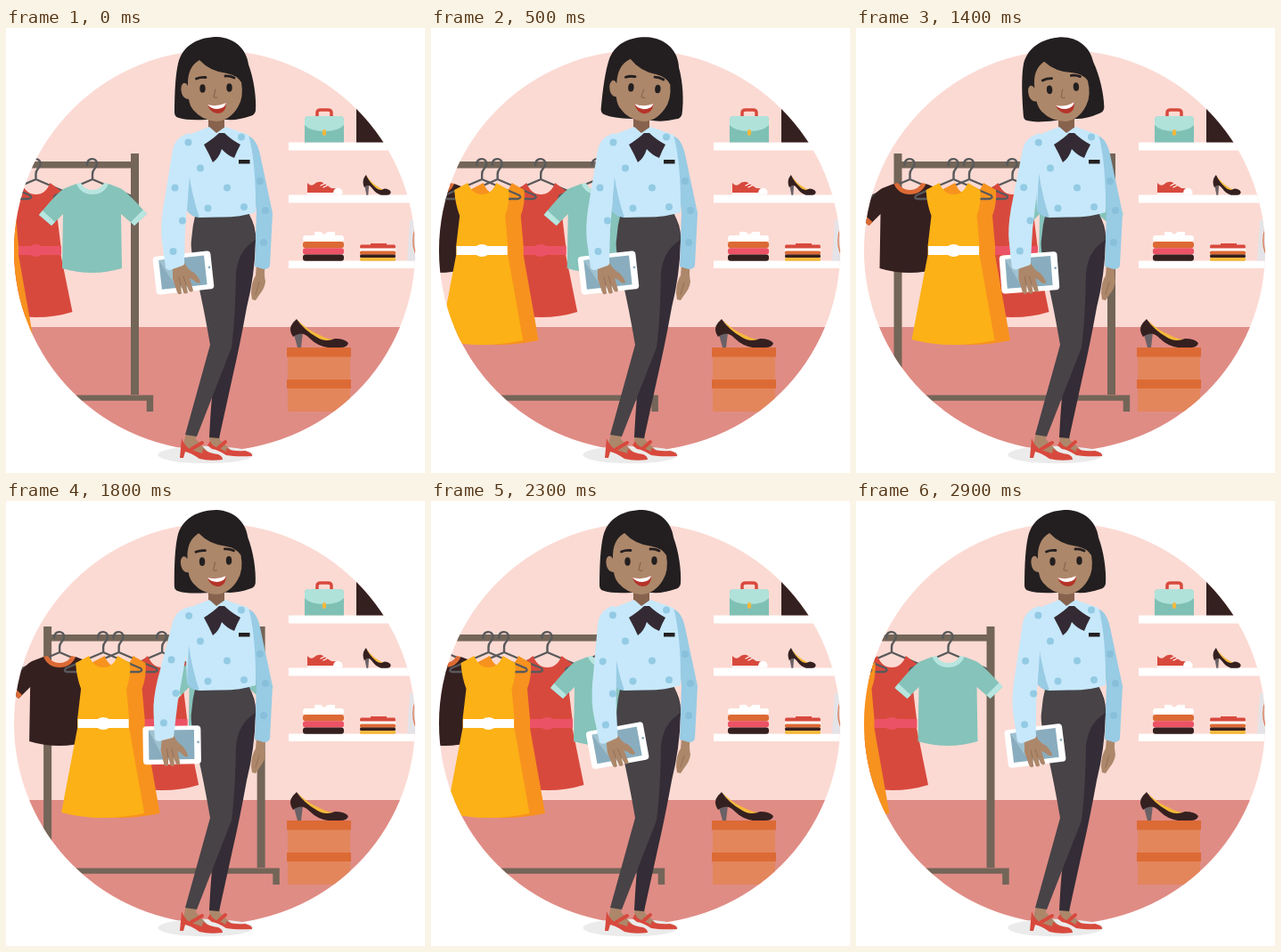
An HTML page for the animation above (3000 ms loop, 470x500 px).

```html
<!DOCTYPE html>
<html lang="en">
<head>
<meta charset="utf-8">
<title>Boutique</title>
<style>
html, body { margin: 0; width: 100%; height: 100%; overflow: hidden; background: #fff; }
svg { display: block; width: 470px; height: 500px; }
.hanger { fill: none; stroke: #58595b; stroke-width: 2.4; stroke-linecap: round; stroke-linejoin: round; }
.skin { fill: #ad876a; }
.hair { fill: #231f20; }
.dot { fill: #93cae4; }
.red { fill: #d8493d; }
.line { fill: none; stroke-linecap: round; stroke-linejoin: round; }
</style>
</head>
<body>
<svg viewBox="0 0 470 500">
<defs>
  <clipPath id="disc"><circle cx="234" cy="250" r="225"/></clipPath>
  <g id="hanger" class="hanger">
    <path d="M-6 154C-7 145 6 145 5 153C4 159 0 158 0 164V170L-42 188Q-45 192 -40 192H40Q45 191 42 188L0 170"/>
  </g>
  <path id="dress" d="M-16 174Q-11 187 0 187Q11 187 16 174L30 182Q31 198 26 211L29 245V255L46 351Q22 356 0 356Q-24 356 -47 350L-29 255V245L-25 211Q-30 198 -31 182Z"/>
  <g id="belt"><rect x="-28.500" y="245" width="57" height="10"/><ellipse cy="250" rx="9" ry="7"/></g>
  <path id="tee" d="M-18 175Q0 192 18 175L31 180Q39 184 61 209L47 222L32 209L33 270Q16 275 0 275Q-18 275 -34 270L-33 209L-46 222L-60 210Q-39 184 -31 180Z"/>
  <path id="cuffs" d="M-60 210L-46 222L-42 218L-56 205ZM61 209L47 222L43 218L57 204Z"/>
  <path id="collar" d="M-18 175Q-13 187 0 187Q13 187 18 175L13 174Q9 182 0 182Q-9 182 -13 174Z"/>
</defs>

<g clip-path="url(#disc)">
  <rect width="470" height="500" fill="#fbdad3"/>
  <rect y="336" width="470" height="164" fill="#df8c85"/>

  <g fill="#fff">
    <rect x="317" y="128.500" width="150" height="9"/>
    <rect x="317" y="187.500" width="150" height="9"/>
    <rect x="317" y="261.500" width="150" height="8.500"/>
  </g>
  <!-- bag and dark bag -->
  <path class="line" d="M349 99V95Q349 92 353 92H361Q365 92 365 95V99" stroke="#d8493d" stroke-width="3.500"/>
  <path d="M339 99H375Q379 99 379 104V128.500H335V104Q335 99 339 99Z" fill="#7fc0b5"/>
  <path d="M339 99H375Q379 99 379 104V109Q373 116 357 116Q341 116 335 109V104Q335 99 339 99Z" fill="#b0e2da"/>
  <rect x="355" y="114" width="4" height="7" rx="2" fill="#f5b83a"/>
  <path d="M393 84H450V128.500H393Z" fill="#352020"/>
  <!-- sneaker and heel -->
  <path class="red" d="M338 174Q341 178 345 176Q349 172 354 173L365 180Q376 180 377 184V186H338Z"/>
  <path d="M338 185H367Q368 179 374 180Q379 182 377 187.500H338Z" fill="#fff"/>
  <path d="M353 177L357 175M356 179L360 177" class="line" stroke="#fff" stroke-width="1.200"/>
  <use href="#pump" transform="translate(400.500 165) scale(.48 .71)"/>
  <!-- folded clothes -->
  <path d="M346 229H353L357 232L361 229H369V233H376Q379 233 379 236.500Q379 240 376 240H336Q333 240 333 236.500Q333 233 336 233H346Z" fill="#fff"/>
  <rect x="333" y="240" width="46" height="7.300" rx="3" fill="#dc6a35"/>
  <rect x="333" y="247.300" width="46" height="7.300" rx="3" fill="#ec5265"/>
  <rect x="333" y="254.500" width="46" height="7.200" rx="3" fill="#352020"/>
  <path class="red" d="M409 242H427V243.500H436Q438 246 436 248H398Q396 246 398 243.500H409Z"/>
  <rect x="397" y="247.500" width="40" height="3.500" rx="1" fill="#fff"/>
  <rect x="397" y="250.500" width="40" height="4.200" rx="1.500" fill="#dc6a35"/>
  <rect x="397" y="254.500" width="40" height="3.500" rx="1.500" fill="#352020"/>
  <rect x="397" y="258" width="40" height="3.700" rx="1.500" fill="#f5b83a"/>
  <path d="M453 216H470V261.500H450Z" fill="#e4e3e7"/>
  <path class="line" d="M460 223Q454 238 459 252" stroke="#dc8460" stroke-width="1.500"/>
  <!-- boxes -->
  <path d="M316 369H386V395H316ZM316 405H386V431H316Z" fill="#e3865c"/>
  <path d="M315 359H387V369.500H315ZM315 395H387V405H315Z" fill="#dc6a35"/>
  <g transform="translate(319 327)">
    <g id="pump">
      <path d="M3 14L14 15L12 32H8Z" fill="#6a6166"/>
      <path d="M8 1Q20 13 33 18Q42 23 50 23L42 28Q24 24 8 1Z" fill="#f5b83a"/>
      <path d="M7 0Q15 12 29 20Q39 27 50 22Q61 22 65 27Q64 32 56 32H42Q30 30 22 22Q15 15 9 17Q5 18 3 20Q-3 11 3 4Z" fill="#352020"/>
    </g>
  </g>

  <g id="rack">
    <path d="M-99 150H141V157.500H-99ZM-99.500 141H-90.500V412H-99.500ZM140 141H149V412H140ZM-115 412.500H165.200V431H157.700V418.800H-115Z" fill="#736558"/>
    <g transform="translate(33.500)">
      <use href="#hanger"/>
      <path class="red" d="M-16 174Q-11 187 0 187Q11 187 16 174L28 183Q28 198 24 212L28 245V255L41 319Q22 325 0 325Q-22 325 -42 319L-28 255V245L-24 212Q-28 198 -28 183Z"/>
      <use href="#belt" fill="#ec5265"/>
    </g>
    <g transform="translate(97)">
      <use href="#hanger"/>
      <use href="#tee" fill="#86c3ba"/>
      <g fill="#b7e5df"><use href="#cuffs"/><use href="#collar"/></g>
    </g>
    <g transform="translate(-81.500)">
      <use href="#hanger"/>
      <use href="#tee" fill="#352020"/>
      <g fill="#dc6a35"><use href="#cuffs"/><use href="#collar"/></g>
    </g>
    <g transform="translate(-15)">
      <use href="#hanger"/>
      <use href="#dress" fill="#f7921e"/>
    </g>
    <g transform="translate(-32.500)">
      <use href="#hanger"/>
      <use href="#dress" fill="#fcb116"/>
      <use href="#belt" fill="#fff"/>
    </g>
  </g>
</g>

<ellipse cx="224" cy="479.500" rx="53.500" ry="9.800" fill="#ebebeb"/>

<!-- feet -->
<path class="skin" d="M202 455H214L213 462L226 476L222 481L210 477L199 468ZM228 457H240V463L252 474L246 478L229 469Z"/>
<path class="red" d="M197 461Q200 470 208 474L220 478L221 473Q228 478 238 479Q243 481 243 485Q228 487 217 484Q207 477 201 476L199 483H195Z"/>
<path class="red" d="M229 464Q231 470 239 472L247 476V472Q254 476 268 475Q277 477 276 481Q258 482 247 480Q238 474 231 473L226 469Z"/>
<path class="line" d="M208 473L220 466M238 472L246 465" stroke="#d8493d" stroke-width="4"/>

<!-- trousers -->
<path d="M272 209Q281 222 280 240Q279 278 270 314Q262 358 255 388L239 461L228 460Q230 420 232 408L250 350L254 250Z" fill="#342c36"/>
<path d="M213 207L272 207Q279 222 280 238Q260 250 258 276Q257 330 253 359L214 459L201 457L229 356Q222 315 215 285Q206 248 208 238Q209 222 213 207Z" fill="#474347"/>

<!-- far arm -->
<path class="skin" d="M281 266H291Q289 274 291 285Q290 293 284 300L280 306L276 305L275 298Q275 286 280 278Z"/>
<path class="line" d="M284 286L280 299" stroke="#8d6a53" stroke-width=".8"/>
<path d="M271 121Q281 124 285 142L299 208L296 267Q295 271 289 271L279 268L281 207Z" fill="#98cbe4"/>

<!-- neck and blouse -->
<path d="M227 94H245V113L236 119L227 113Z" fill="#87624d"/>
<path d="M228 111L236 118L246 111L272 120Q279 145 280 190V207Q262 213 238 212.500L216 213L203 205L200 122Z" fill="#c6e8fa"/>
<path d="M205 162Q209 190 217 213Q207 212 203 205Z" fill="#98cbe4"/>
<g class="dot">
  <circle cx="264" cy="122.500" r="4"/><circle cx="218" cy="157.500" r="4"/>
  <circle cx="248" cy="179.500" r="4"/><circle cx="267" cy="201" r="4"/>
  <circle cx="226.500" cy="202.500" r="4"/>
</g>
<g fill="#88bfda"><circle cx="285" cy="172" r="4"/><circle cx="291" cy="205" r="4"/><circle cx="289" cy="241" r="4"/></g>
<path d="M222 131Q233 124 239 118H245Q252 125 263 131Q259 138 256 146Q248 143 242 136Q239 146 232 151Q228 142 222 131Z" fill="#342a34"/>
<rect x="261" y="148" width="12.500" height="4.500" fill="#231f20"/>

<g id="arm">
  <g transform="rotate(-6.200 199 275)">
    <rect x="166.500" y="253.500" width="65" height="43" rx="4" fill="#fff"/>
    <rect x="173" y="258" width="51" height="33" fill="#89adbe"/>
    <path d="M173 258H179L206 291H190Z" fill="#a0c2d0"/>
    <circle cx="228.500" cy="272" r="1.400" fill="#89adbe"/>
  </g>
  <path class="skin" d="M187 266L200 263Q203 271 211 275Q217 281 218 286Q215 288 210 283L206 281L210 295Q208 298 205 295L202 288L204 297Q201 300 199 297L196 288L197 298Q194 301 192 297L187 282Z"/>
  <path class="line" d="M202 288L199 279M196 289L194 280" stroke="#8d6a53" stroke-width=".8"/>
  <path d="M206 118Q190 122 187 137L176 204Q173 226 175 240L179 269Q180 272 184 272L198 267Q201 266 200 262L201 226L206 166L214 132Z" fill="#c6e8fa"/>
  <g class="dot">
    <circle cx="204.500" cy="128.500" r="4"/><circle cx="189.500" cy="179.500" r="4"/>
    <circle cx="198" cy="216.500" r="4"/><circle cx="187.500" cy="251" r="4"/>
  </g>
</g>

<g id="head">
  <path class="hair" d="M189 95Q189 58 193 40C198 18 218 10 237 10C257 11 270 24 272 41C278 57 281 78 280 93Q279 98 274 99Q260 104 248 103H224Q203 104 194 101Q189 100 189 95Z"/>
  <path class="skin" d="M217 36Q229 49 248 51Q259 53 264 61Q267 78 260 89Q251 104 236 105Q220 104 210 92Q206 87 205 80Q199 80 197 73Q195 65 199 62Q202 61 204 65Q203 44 217 36Z"/>
  <path class="line" d="M213.500 57Q218 55 224 55.500M246 54Q251 53.500 256 56" stroke="#231f20" stroke-width="2.800"/>
  <g class="hair"><ellipse cx="220.500" cy="68" rx="3.200" ry="4.800"/><ellipse cx="250.500" cy="67" rx="3.200" ry="4.800"/></g>
  <path class="line" d="M235 69L233 77Q234 79 237 78" stroke="#8a664f" stroke-width="1.200"/>
  <path d="M226 86Q237 89 247 84Q247 96 237 96Q229 95 226 86Z" fill="#b5342a"/>
  <path d="M226 86Q237 89 247 84Q246 90 237 91Q230 91 226 86Z" fill="#fff"/>
</g>
</svg>

<script>
const LOOP = 3000, STEP = 100;
const $ = id => document.getElementById(id);
const rack = $('rack'), head = $('head'), arm = $('arm');

// [time, value] pairs
const headKeys = [[0, 0], [400, 5], [600, 5], [1000, -5], [1300, -5], [1800, -.6], [2000, 0], [3000, 0]];
const armKeys = [[0, 0], [1200, 0], [1700, 5.3], [1800, 5.3], [2300, -4.2], [2500, -5.5], [2600, -5.3], [2900, -.8], [3000, 0]];
const backKeys = [[2300, 97], [2400, 86], [2600, 53.5], [2900, 6.5], [3000, 0]];

const smooth = k => k * k * (3 - 2 * k);
const linear = k => k;

function at(keys, t, ease) {
  const i = Math.max(1, keys.findIndex(k => k[0] >= t));
  const [t0, a] = keys[i - 1], [t1, b] = keys[i];
  return a + (b - a) * ease((t - t0) / (t1 - t0));
}

function rackShift(t) {
  if (t < 1750) return 142 * (.5 - .5 * Math.cos(Math.PI * Math.min(1, t / 855)));
  if (t < 2300) return 142 - 45 * ((t - 1750) / 550) ** 2;
  return at(backKeys, t, linear);
}

function draw(now) {
  const t = Math.floor(now % LOOP / STEP) * STEP;
  rack.setAttribute('transform', `translate(${rackShift(t)})`);
  head.setAttribute('transform', `rotate(${at(headKeys, t, smooth)} 236 112)`);
  arm.setAttribute('transform', `rotate(${at(armKeys, t, smooth)} 200 136)`);
}

let start;
function tick(now) {
  start ??= now;
  draw(now - start);
  requestAnimationFrame(tick);
}
draw(0);
requestAnimationFrame(tick);
</script>
</body>
</html>
```
